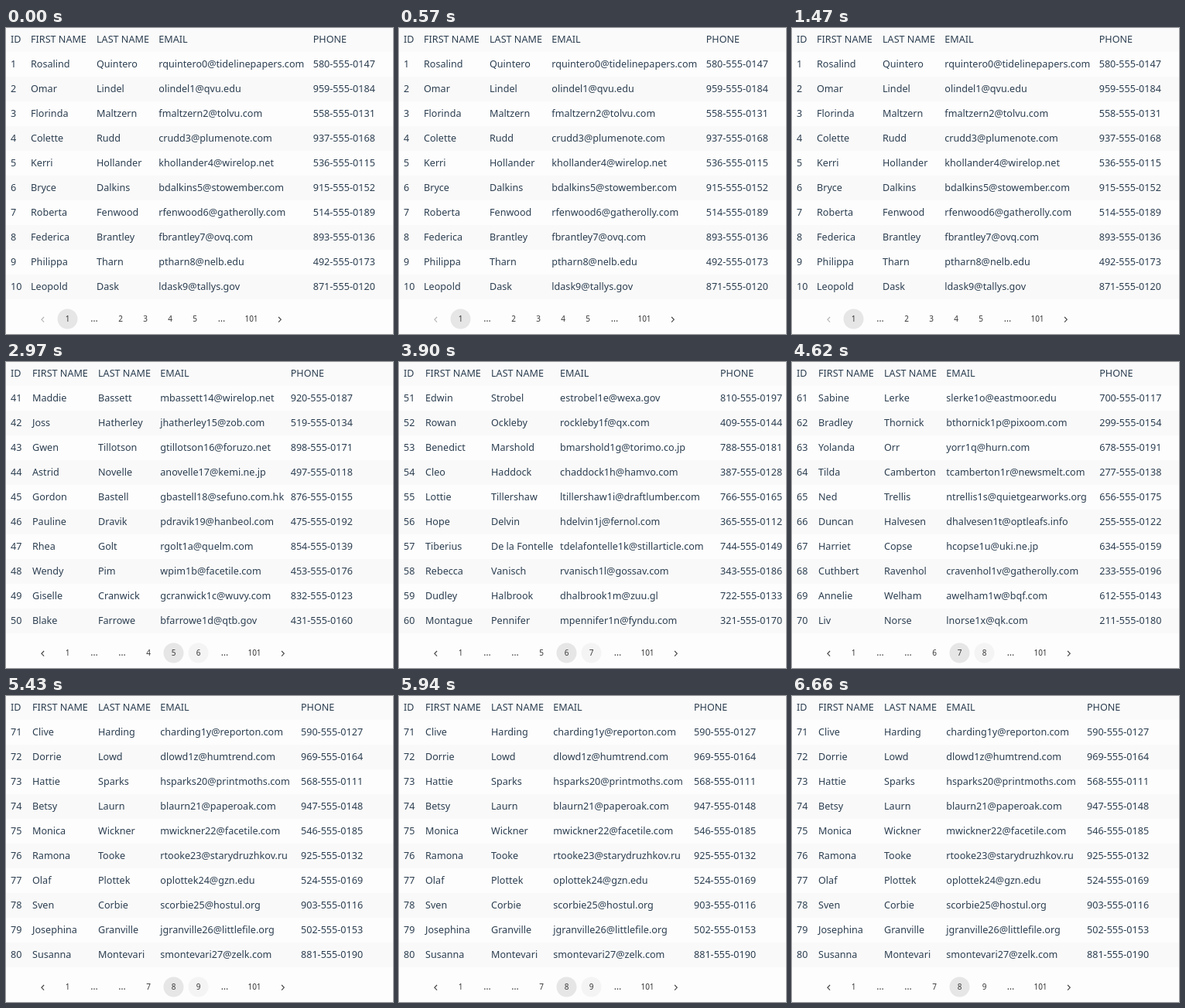
Write an HTML page that moves like this. It is 500 by 396 pixels and loops after 6.69 s.

```html
<!DOCTYPE html>
<html lang="en">
<head>
<meta charset="utf-8">
<title>Paginated table</title>
<style>
  html, body { margin: 0; width: 100%; height: 100%; overflow: hidden; background: #fdfdfd; }
  svg { display: block; width: 500px; height: 396px; }
  text { font-family: "Noto Sans", "Open Sans", sans-serif; font-size: 12.6px; fill: #2c3e50; }
  .pager text { font-size: 10px; font-weight: 500; text-anchor: middle; fill: #383838; }
  .pager .gap { font-size: 12px; }
  .pager path { fill: none; stroke: #404040; stroke-width: 1.1; }
  .pager .disabled { stroke: #b4b4b4; }
</style>
</head>
<body>
<svg id="stage" viewBox="0 0 500 396"></svg>
<script>
const LOOP = 6690;
const HEADINGS = ["ID", "FIRST NAME", "LAST NAME", "EMAIL", "PHONE"];

// Per page: column positions, then "first,last,domain" for ten people.
const pages = {
  1: { columns: [6, 32, 117, 197.3, 396.7], people: `Rosalind,Quintero,tidelinepapers.com
Omar,Lindel,qvu.edu
Florinda,Maltzern,tolvu.com
Colette,Rudd,plumenote.com
Kerri,Hollander,wirelop.net
Bryce,Dalkins,stowember.com
Roberta,Fenwood,gatherolly.com
Federica,Brantley,ovq.com
Philippa,Tharn,nelb.edu
Leopold,Dask,tallys.gov` },
  5: { columns: [6, 34, 119, 199.3, 367.7], people: `Maddie,Bassett,wirelop.net
Joss,Hatherley,zob.com
Gwen,Tillotson,foruzo.net
Astrid,Novelle,kemi.ne.jp
Gordon,Bastell,sefuno.com.hk
Pauline,Dravik,hanbeol.com
Rhea,Golt,quelm.com
Wendy,Pim,facetile.com
Giselle,Cranwick,wuvy.com
Blake,Farrowe,qtb.gov` },
  6: { columns: [6, 34, 119, 208.1, 415], people: `Edwin,Strobel,wexa.gov
Rowan,Ockleby,qx.com
Benedict,Marshold,torimo.co.jp
Cleo,Haddock,hamvo.com
Lottie,Tillershaw,draftlumber.com
Hope,Delvin,fernol.com
Tiberius,De la Fontelle,stillarticle.com
Rebecca,Vanisch,gossav.com
Dudley,Halbrook,zuu.gl
Montague,Pennifer,fyndu.com` },
  7: { columns: [6, 34, 119, 199.3, 397.2], people: `Sabine,Lerke,eastmoor.edu
Bradley,Thornick,pixoom.com
Yolanda,Orr,hurn.com
Tilda,Camberton,newsmelt.com
Ned,Trellis,quietgearworks.org
Duncan,Halvesen,optleafs.info
Harriet,Copse,uki.ne.jp
Cuthbert,Ravenhol,gatherolly.com
Annelie,Welham,bqf.com
Liv,Norse,qk.com` },
  8: { columns: [6, 34, 119, 199.3, 381], people: `Clive,Harding,reporton.com
Dorrie,Lowd,humtrend.com
Hattie,Sparks,printmoths.com
Betsy,Laurn,paperoak.com
Monica,Wickner,facetile.com
Ramona,Tooke,starydruzhkov.ru
Olaf,Plottek,gzn.edu
Sven,Corbie,hostul.org
Josephina,Granville,littlefile.org
Susanna,Montevari,zelk.com` }
};

// Each state holds from its start time until the next one.
const timeline = [
  { at: 0, page: 1, hover: null },
  { at: 2250, page: 1, hover: 5 },
  { at: 2880, page: 5, hover: 6 },
  { at: 3600, page: 6, hover: 7 },
  { at: 4470, page: 7, hover: 8 },
  { at: 5190, page: 8, hover: 9 },
  { at: 6120, page: 8, hover: null }
];

const stage = document.getElementById("stage");

const text = (x, y, value, cls = "") => `<text x="${x}" y="${y}" class="${cls}">${value}</text>`;
const disc = (x, color) => `<circle cx="${x}" cy="376.5" r="13" fill="${color}"/>`;
const chevron = (x, dir, cls = "") =>
  `<path class="${cls}" d="M${x - dir * 1.6} 374l${dir * 3.2} 3.3l${-dir * 3.2} 3.3"/>`;

function phone(id) {
  const area = 201 + (id * 379) % 780;
  const line = 10 + (id * 37) % 90;
  return `${area}-555-01${line}`;
}

function personCells(entry, id) {
  const [first, last, domain] = entry.split(",");
  const user = (first[0] + last).toLowerCase().replace(/ /g, "") + (id - 1).toString(36);
  return [id, first, last, `${user}@${domain}`, phone(id)];
}

function drawTable(page) {
  const { columns, people } = pages[page];
  const row = (cells, y) => cells.map((cell, i) => text(columns[i], y, cell)).join("");
  let out = `<rect width="500" height="30.5" fill="#fafafa"/>` + row(HEADINGS, 19);
  people.split("\n").forEach((entry, i) => {
    const top = 31 + i * 32;
    if (i % 2) out += `<rect y="${top}" width="500" height="32" fill="#f9f9f9"/>`;
    out += row(personCells(entry, (page - 1) * 10 + i + 1), top + 20);
  });
  return out;
}

function drawPager(page, hover) {
  const atStart = page === 1;
  const items = atStart
    ? [[1, 79.5], ["…", 114], [2, 148], [3, 180], [4, 212], [5, 244], ["…", 278.5], [101, 317]]
    : [[1, 79.5], ["…", 114], ["…", 150], [page - 1, 184], [page, 216.5], [page + 1, 248.5],
       ["…", 282.5], [101, 321]];
  let out = chevron(47.5, -1, atStart ? "disabled" : "");
  for (const [label, x] of items) {
    if (label === page) out += disc(x, "#e6e6e6");
    else if (label === hover) out += disc(x, "#f4f4f4");
    out += text(x, 380.2, label, label === "…" ? "gap" : "");
  }
  return `<g class="pager">${out}${chevron(atStart ? 353.7 : 357.7, 1)}</g>`;
}

let shown = null;
function update(time) {
  const state = timeline.findLast(step => step.at <= time);
  if (state === shown) return;
  shown = state;
  stage.innerHTML = drawTable(state.page) + drawPager(state.page, state.hover);
}

function tick(now) {
  update(now % LOOP);
  requestAnimationFrame(tick);
}
update(0);
requestAnimationFrame(tick);
</script>
</body>
</html>
```
